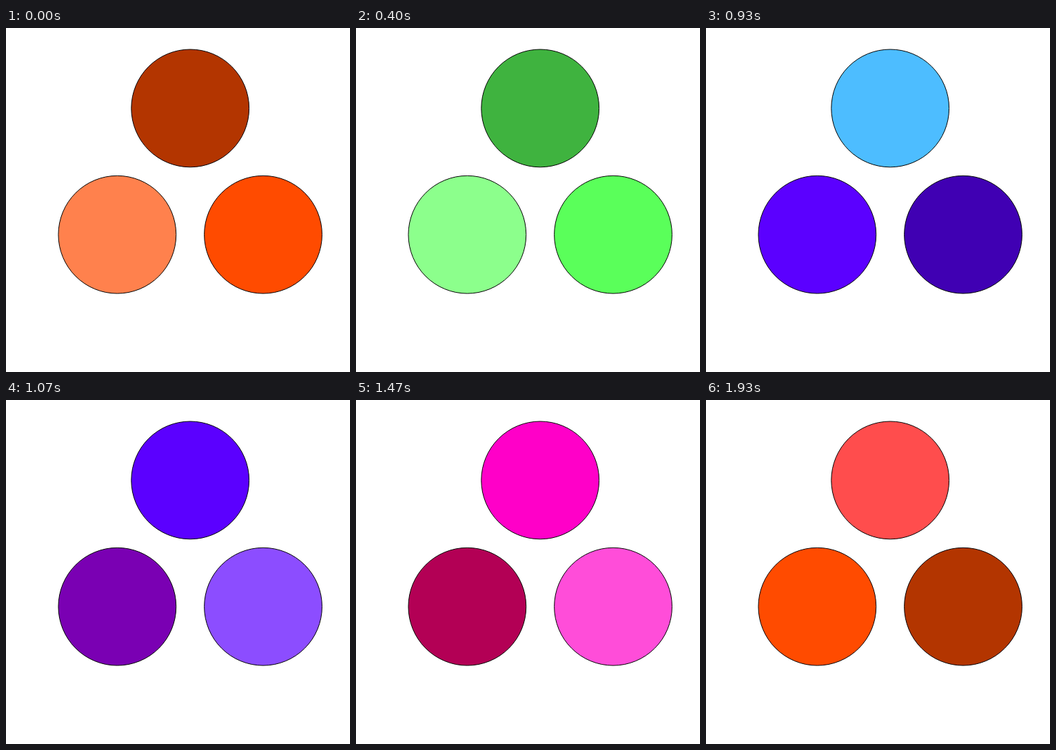
An HTML page that plays this animation: 499 by 499 pixels, repeating every 1990 ms.

```html
<!DOCTYPE html>
<html lang="en">
<head>
<meta charset="utf-8">
<title>Colour cycle</title>
<style>
  html, body { margin: 0; width: 100%; height: 100%; overflow: hidden; background: #fff; }
  svg { display: block; width: 100%; height: 100%; }
  circle { stroke: #000; stroke-width: 1; }
</style>
</head>
<body>
<svg viewBox="0 0 499 499"></svg>
<script>
  const LOOP = 1990;
  const CENTER = { x: 267.2, y: 238.6 };
  const ORBIT = 122.2;
  const RADIUS = 85.4;

  // Each colour appears dark, plain and light in turn.
  const colors = ['#ff4b00', '#ffe600', '#5aff5a', 'cyan', '#00a0ff',
    '#5b00ff', '#ae00ff', '#ff00c8', '#ff007a', 'red'];
  const mix = (color, other) => `color-mix(in srgb, ${color} 70%, ${other})`;
  const palette = colors.flatMap(c => [mix(c, 'black'), c, mix(c, 'white')]);

  // Corners of an equilateral triangle, clockwise from the top.
  const svg = document.querySelector('svg');
  const circles = Array.from({ length: 3 }, (_, i) => {
    const angle = i * 2 * Math.PI / 3;
    const circle = document.createElementNS(svg.namespaceURI, 'circle');
    circle.setAttribute('cx', CENTER.x + ORBIT * Math.sin(angle));
    circle.setAttribute('cy', CENTER.y - ORBIT * Math.cos(angle));
    circle.setAttribute('r', RADIUS);
    return svg.appendChild(circle);
  });

  function render(time) {
    // 15 steps per second, with change times rounded to 10 ms
    const tick = Math.floor((time % LOOP) / 10);
    const step = Math.floor((tick + 0.5) * 3 / 20);
    circles.forEach((circle, i) => {
      circle.style.fill = palette[(step + i) % palette.length];
    });
  }

  const start = performance.now();
  function loop() {
    render(performance.now() - start);
    requestAnimationFrame(loop);
  }
  loop();
</script>
</body>
</html>
```
